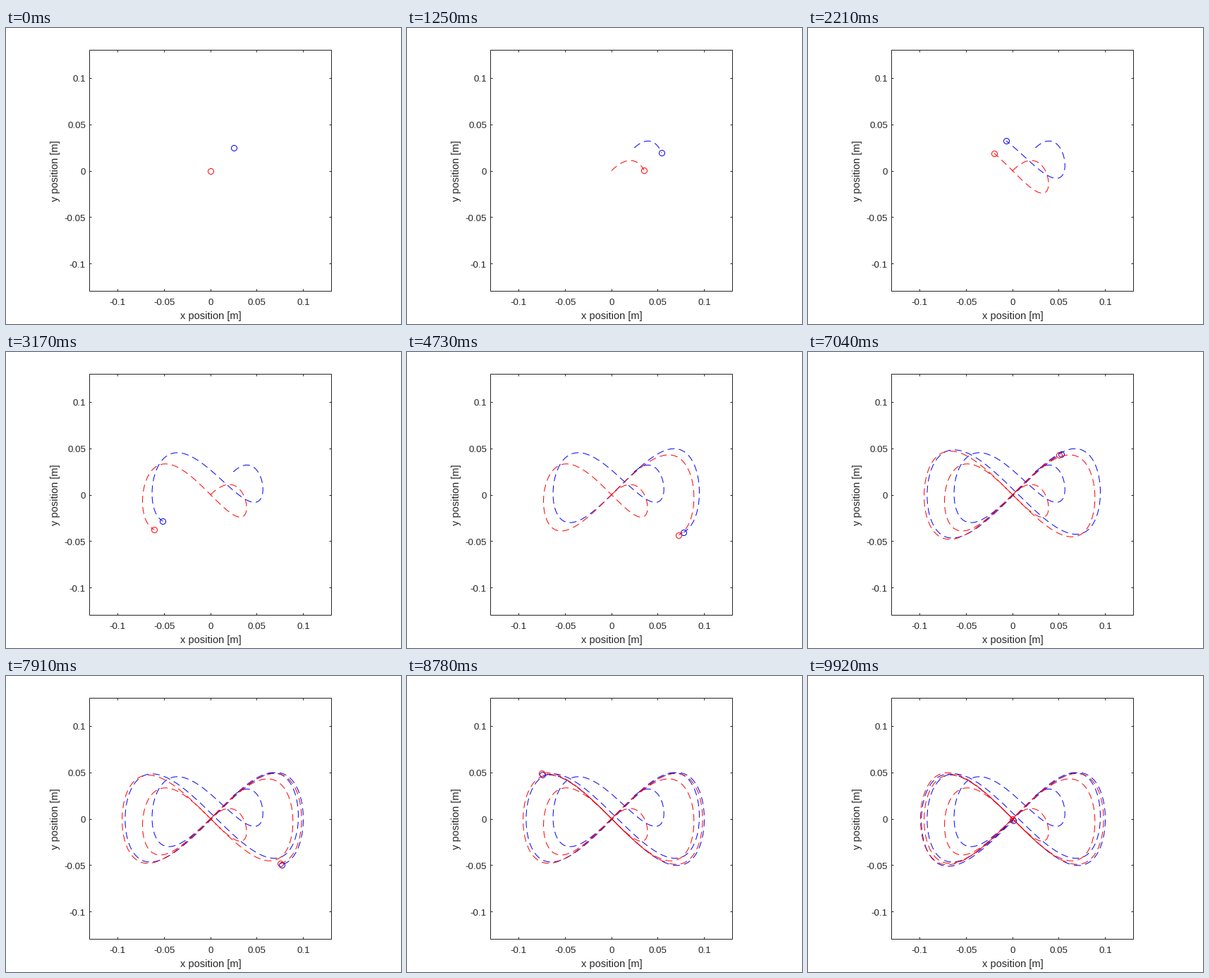
A matplotlib script for the animation above (9.95 s loop, 560 px wide and 420 px high).

```python
import numpy as np
import matplotlib.pyplot as plt
from matplotlib.animation import FuncAnimation
from matplotlib.patches import Rectangle

W, H = 560, 420
PX = 0.72                      # points per pixel at 100 dpi
STEP, HOLD, DELAY, LOOP = 25, 500, 30, 9950   # ms
LEAD = 20                      # ms, lets each tick show the pose that starts in it
LAST = (LOOP - HOLD) // DELAY

LEFT, RIGHT, TOP, BOTTOM = 118, 461, 31, 373
CX, CY, SCALE = 290, 202.5, 1317   # screen centre and pixels per metre
INK = "#262626"
TICKS = [-0.1, -0.05, 0, 0.05, 0.1]


def paths():
    """Screen coordinates of the growing figure eight and its follower."""
    th = np.linspace(0, 6 * np.pi, LAST + 1)
    amp = 0.1 * (1 - np.exp(-0.277 * th))
    x = CX + SCALE * amp * np.sin(th)
    y = CY - SCALE * amp * np.sin(th) * np.cos(th)
    error = 33 * np.exp(-0.185 * th)
    drift = np.interp(th, [0, 7, 8.5, 10.2, 11.8, 13.35, 14.9, 16.6, 18.85],
                      [0, 0, -3, -3.3, -1.9, -1.5, -3.7, -3.5, -3.2])
    return (x, y), (x + error, y - error - drift)


def draw_axes(ax):
    line = dict(colors=INK, linewidths=PX)
    ax.add_patch(Rectangle((LEFT, TOP), RIGHT - LEFT, BOTTOM - TOP,
                           fill=False, ec=INK, lw=PX, joinstyle="miter"))
    pos = np.array(TICKS) * SCALE
    xs, ys = CX - 0.5 + pos, CY - pos
    ax.vlines(xs, TOP, TOP + 3, **line)
    ax.vlines(xs, BOTTOM - 3, BOTTOM, **line)
    ax.hlines(ys, LEFT, LEFT + 3, **line)
    ax.hlines(ys, RIGHT - 3, RIGHT, **line)

    small = dict(fontsize=13.33 * PX, color=INK, va="baseline")
    for value, x, y in zip(TICKS, xs, ys):
        ax.text(x + 0.5, 393, f"{value:g}", ha="center", **small)
        ax.text(113, y + 5.6, f"{value:g}", ha="right", **small)

    big = dict(fontsize=14.67 * PX, color=INK, ha="center", va="baseline")
    ax.text(CX, 413, "x position [m]", **big)
    ax.text(74, CY, "y position [m]", rotation=90, rotation_mode="anchor", **big)


def add_runner(ax, color):
    trail, = ax.plot([], [], color=color, lw=PX, dashes=(10, 6),
                     dash_capstyle="butt")
    head, = ax.plot([], [], "o", ms=8 * PX, mfc="none", mec=color, mew=PX)
    return trail, head


plt.rcParams["font.family"] = "Liberation Sans"
plt.rcParams["axes.unicode_minus"] = False
fig = plt.figure(figsize=(W / 100, H / 100), dpi=100, facecolor="white")
ax = fig.add_axes([0, 0, 1, 1])
ax.axis("off")
draw_axes(ax)
ax.set(xlim=(0, W), ylim=(H, 0))

leader, follower = paths()
runners = [(follower, add_runner(ax, "blue")), (leader, add_runner(ax, "red"))]


def update(i):
    t = i * STEP + LEAD
    k = 0 if t < HOLD else min((t - HOLD) // DELAY + 1, LAST)
    artists = []
    for (x, y), (trail, head) in runners:
        trail.set_data(x[:k + 1], y[:k + 1])
        head.set_data(x[k:k + 1], y[k:k + 1])
        artists += [trail, head]
    return artists


anim = FuncAnimation(fig, update, frames=LOOP // STEP, interval=STEP,
                     repeat=True, repeat_delay=0, cache_frame_data=False)
plt.show()
```
